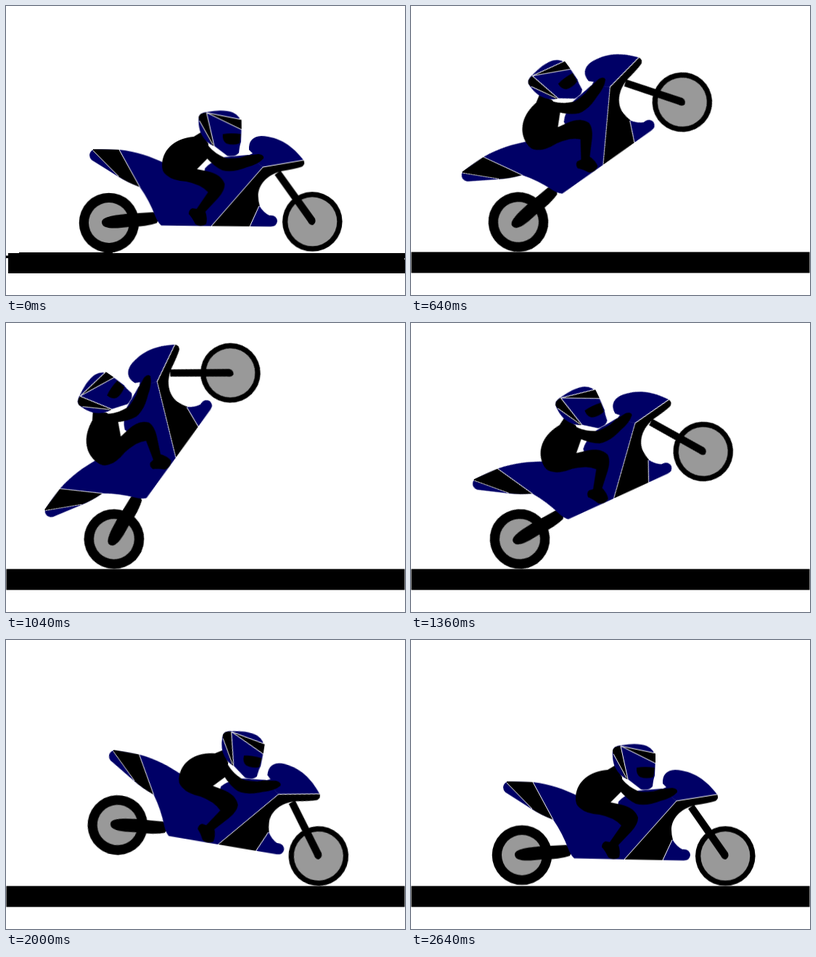
Write an HTML page that moves like this. It is 550 by 400 pixels and loops after 2.8 s.

```html
<!DOCTYPE html>
<html lang="en">
<head>
<meta charset="utf-8">
<title>Motorbike wheelie</title>
<style>
  html, body { margin: 0; width: 100%; height: 100%; overflow: hidden; background: #fff; }
  svg { display: block; width: 550px; height: 400px; }
  .navy { fill: #006; }
  .tyre { fill: #000; }
  .rim { fill: #999; }
  .seam { fill: none; stroke: #fff; stroke-width: 1; }
  #bike { transform-origin: 0 0; }
</style>
</head>
<body>
<svg viewBox="0 0 550 400">
  <rect id="road" x="0.500" y="340.500" width="549" height="29"/>
  <path id="roughRoad" d="M3 342H18V341H147V342H550V349L548.5 350L550 351V370H3V349H0V345.500H3Z"/>
  <g id="bike">
    <!-- drawn level, with the rear axle at 153,298 -->
    <g transform="translate(-153 -298)">
      <circle class="tyre" cx="153" cy="298" r="41.300"/>
      <circle class="rim" cx="153" cy="298" r="28"/>
      <circle class="tyre" cx="433.300" cy="299.300" r="41.300"/>
      <circle class="rim" cx="433.300" cy="299.300" r="34"/>
      <path d="M143 297C144 290 157 288 176 286L214 284Q224 290 219 299Q205 304 181 304C163 306 143 308 143 297Z"/>
      <path d="M382 234L390 228L437 295Q439 301 434 304Q429 304 427 299Z"/>

      <path class="navy" d="M127 204Q128 197 135 196L168 197C193 200 211 207 230 216L250 234L289 238Q284 231 286 224Q291 217 311 209L346 206L366 223L294 304L225 302.500Q220 298 217 290Q209 268 196 249Q178 242 166 234L130 211Q127 208 127 204Z"/>
      <path d="M132 196L168 197L196 249Q178 242 167 234L132 199Z"/>
      <path class="navy" d="M347 199Q346 181 364 180C389 181 408 195 422 214L366 223L345 207L352 204Z"/>
      <path d="M366 223L422 214Q425 219 420 223Q411 226 391 229C371 234 359 248 359 263Q359 270 361 277L347 305L294 304Z"/>
      <path class="navy" d="M360 276Q366 286 374 290Q384 289 385 298Q384 306 375 305.500L347 305Z"/>
      <path class="seam" d="M132 198L167 234M168 197L196 249M422 214L366 223L294 304M360 277L347 305"/>

      <path d="M227 217C229 195 247 182 271 180L281 174L291 190L291 209L275 225L289 228Q308 232 313 246Q313 255 304 265L286 284Q289 293 287 301Q279 306 272 301Q267 291 263 287Q263 281 268 279L274 280L290 257Q280 246 260 242Q242 241 233 233Q226 228 227 217Z"/>
      <path d="M285 184L292 194Q299 203 314 210Q332 212 343 207L360 205Q368 206 367 211Q360 219 344 223Q324 231 310 227Q299 222 287 208Z"/>

      <path class="navy" d="M278 153Q279 147 290 146Q312 142 325 147Q336 152 337 164L336 188Q334 193 333 203Q328 209 317 207L299 193Q288 190 281 176Q277 166 278 153Z"/>
      <path d="M278 153Q280 147 289 147L299 193L296 192L279 158Z"/>
      <path d="M289 147L337 157V171Z"/>
      <path d="M311 177Q322 175 336 177L334 190Q325 193 316 190Q310 186 311 177Z"/>
      <path class="seam" d="M279 158L297 191M299 193L289 147L337 157M289 147L337 171"/>
    </g>
  </g>
</svg>
<script>
const LOOP = 2800, STEP = 80, WHEELBASE = 280.3, GROUND_Y = 299, TILT = 0.27;

// [step, angle of the axle line in degrees, rear axle x when level]
const keys = [
  [0, 0.3, 142], [4, 15.1, 145], [7, 33, 147.3], [8, 36.3, 148],
  [12, 62.6, 148.8], [13, 55.1, 149], [17, 25.6, 150], [20, 3.5, 150.2],
  [21, 0, 150.3], [25, -8.8, 150.5], [29, 0, 150.5], [31, -0.1, 151.7], [33, -0.27, 153]
];

function poseAt(step) {
  const i = Math.max(1, keys.findIndex(k => k[0] >= step));
  const [s0, a0, x0] = keys[i - 1], [s1, a1, x1] = keys[i];
  const p = (step - s0) / (s1 - s0);
  const angle = a0 + (a1 - a0) * p;
  let x = x0 + (x1 - x0) * p, y = step === 0 ? 300 : GROUND_Y;
  // nose down: the front axle becomes the pivot
  if (angle < 0) {
    const r = angle * Math.PI / 180;
    x += WHEELBASE * (1 - Math.cos(r));
    y += WHEELBASE * Math.sin(r);
  }
  return `translate(${x.toFixed(2)}px, ${y.toFixed(2)}px) rotate(${(-angle - TILT).toFixed(2)}deg)`;
}

const timing = { duration: LOOP, iterations: Infinity };
const hold = (offset, style) => ({ offset, easing: "step-end", ...style });
const play = (id, frames) => document.getElementById(id).animate(frames, timing);

const steps = [...Array(30).keys(), 31, 33];
const ride = steps.map(s => hold(s * STEP / LOOP, { transform: poseAt(s) }));
play("bike", [...ride, { offset: 1, transform: poseAt(33) }]);

const swap = (id, first, rest) => play(id, [
  hold(0, { opacity: first }), hold(STEP / LOOP, { opacity: rest }), { offset: 1, opacity: rest }
]);
swap("road", 0, 1);
swap("roughRoad", 1, 0);
</script>
</body>
</html>
```
